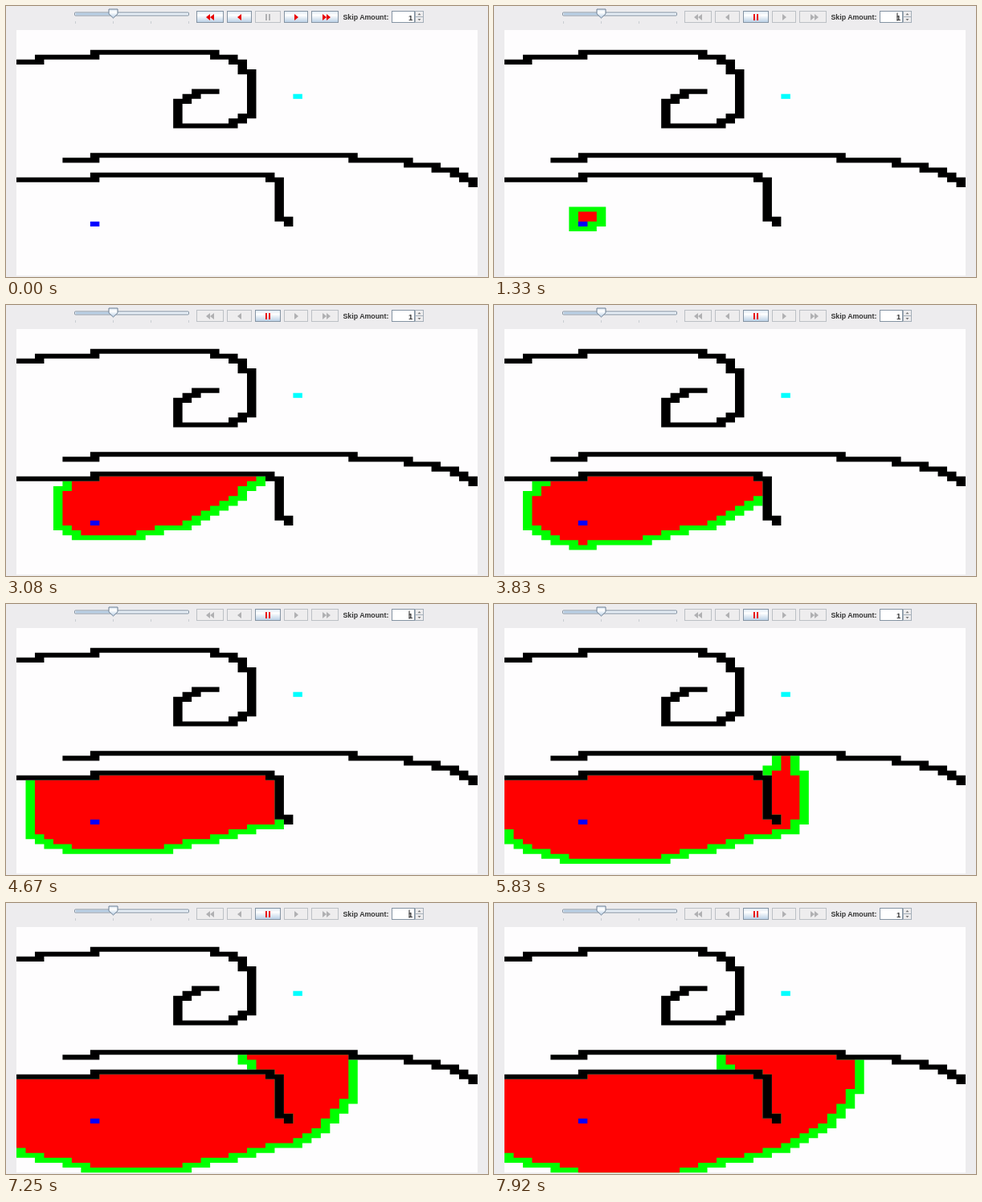
An HTML page that plays this animation: 600x338 px, repeating every 8000 ms.

```html
<!DOCTYPE html>
<html lang="en">
<head>
<meta charset="utf-8">
<title>Path search</title>
<style>
html, body { margin: 0; width: 100%; height: 100%; overflow: hidden; background: #edecee; }
svg { display: block; width: 600px; height: 338px; }
text { font-family: "Liberation Sans", Arial, sans-serif; font-weight: bold; fill: #333; }
.button rect { fill: url(#metal); stroke: #8594a3; }
.button path { fill: #e80000; }
.button.off rect { fill: #eeedee; stroke: #bcc0c5; }
.button.off path { fill: #b0b0b2; }
.button.pressed rect { fill: #b8cfe5; }
</style>
</head>
<body>
<svg viewBox="0 0 600 338">
  <defs>
    <linearGradient id="metal" x2="0" y2="1">
      <stop offset="0" stop-color="#dde8f3"/>
      <stop offset=".35" stop-color="#fff"/>
      <stop offset="1" stop-color="#b8cfe5"/>
    </linearGradient>
  </defs>
  <rect width="600" height="338" fill="#edecee"/>

  <rect x="85.5" y="8" width="142" height="4" rx="1" fill="#e6eef6" stroke="#8594a3"/>
  <path d="M87 10H132" stroke="#b8cfe5" stroke-width="2"/>
  <path d="M86.5 19v3M133.5 19v3M180.5 19v3M227.5 19v3" stroke="#c9cdd2"/>
  <path d="M128 4H139V9.8L133.5 15L128 9.8Z" fill="url(#metal)" stroke="#6c7f93"/>

  <g id="buttons"></g>

  <text x="419.5" y="17.3" font-size="8.8">Skip Amount:</text>
  <rect x="480.5" y="6.5" width="28" height="14" fill="#fff" stroke="#8594a3"/>
  <text x="506.3" y="17.5" font-size="9.5">1</text>
  <path id="caret" d="M502 8.5V18.5" stroke="#222"/>
  <g fill="#eeedee" stroke="#a4aeb8">
    <rect x="509.5" y="6.5" width="10" height="7"/>
    <rect x="509.5" y="13.5" width="10" height="7"/>
  </g>
  <path d="M512.5 11.2L514.5 9L516.5 11.2ZM512.5 16L514.5 18.2L516.5 16Z" fill="#777"/>

  <rect x="13" y="30" width="574" height="306.2" fill="#fefdfe"/>
  <path id="reached" fill="#0f0"/>
  <path id="closed" fill="#f00"/>
  <path id="walls" fill="#000"/>
  <path id="start" fill="#00f"/>
  <path id="goal" fill="#0ff"/>
</svg>
<script>
const SIZE = 50, LOOP = 8000, RUN_AT = 1167, TICK = 1000 / 12;
const start = [8, 39], goal = [30, 13];

// Wall runs: row, first column, last column
const wallRuns = [
  [6, 0, 2], [5, 2, 8], [4, 8, 21], [5, 21, 23], [6, 23, 24], [7, 24, 24], [8, 24, 25],
  [17, 24, 25], [18, 23, 24], [19, 17, 23], [14, 17, 18], [13, 18, 19], [12, 19, 21],
  [26, 5, 8], [25, 8, 36], [26, 36, 42], [27, 42, 45], [28, 45, 47], [29, 47, 48],
  [30, 48, 49], [31, 49, 49],
  [30, 0, 8], [29, 8, 27], [30, 27, 28], [38, 28, 29], [39, 29, 29]
];
const addColumn = (col, top, bottom) => {
  for (let row = top; row <= bottom; row++) wallRuns.push([row, col, col]);
};
addColumn(25, 9, 16);
addColumn(17, 15, 18);
addColumn(28, 31, 37);

const byId = id => document.getElementById(id);
const cellX = col => (13 + col * 11.48).toFixed(2);
const cellY = row => (30.15 + row * 6.12).toFixed(2);
const runPath = ([row, a, b]) =>
  `M${cellX(a)} ${cellY(row)}H${cellX(b + 1)}V${cellY(row + 1)}H${cellX(a)}Z`;
const cellsPath = test => {
  let d = '';
  for (let row = 0; row < SIZE; row++) {
    for (let col = 0; col < SIZE; col++) {
      if (!test(row * SIZE + col)) continue;
      const first = col;
      while (col + 1 < SIZE && test(row * SIZE + col + 1)) col++;
      d += runPath([row, first, col]);
    }
  }
  return d;
};

// A* with costs 10 and 14; ties go to the cell that was opened first.
function search() {
  const blocked = new Set();
  for (const [row, a, b] of wallRuns)
    for (let col = a; col <= b; col++) blocked.add(row * SIZE + col);

  const count = SIZE * SIZE;
  const openedAt = new Array(count).fill(Infinity);
  const closedAt = new Array(count).fill(Infinity);
  const cost = new Array(count).fill(Infinity);
  const estimate = (col, row) => {
    const dx = Math.abs(col - goal[0]), dy = Math.abs(row - goal[1]);
    return 10 * Math.max(dx, dy) + 4 * Math.min(dx, dy);
  };
  const total = ([col, row]) => cost[row * SIZE + col] + estimate(col, row);
  const queue = [start];
  cost[start[1] * SIZE + start[0]] = 0;

  for (let step = 0; step < 700 && queue.length; step++) {
    let best = 0;
    queue.forEach((cell, i) => { if (total(cell) < total(queue[best])) best = i; });
    const [col, row] = queue.splice(best, 1)[0];
    const here = row * SIZE + col;
    closedAt[here] = step;
    if (col === goal[0] && row === goal[1]) break;
    for (let dx = -1; dx <= 1; dx++) {
      for (let dy = -1; dy <= 1; dy++) {
        const x = col + dx, y = row + dy, next = y * SIZE + x;
        if (x < 0 || y < 0 || x >= SIZE || y >= SIZE) continue;
        if (blocked.has(next) || closedAt[next] < Infinity) continue;
        if (cost[next] === Infinity) {
          openedAt[next] = step;
          queue.push([x, y]);
        }
        cost[next] = Math.min(cost[next], cost[here] + (dx && dy ? 14 : 10));
      }
    }
  }
  return { openedAt, closedAt };
}

// The search slows slightly as its queue grows.
const stepsAt = tick =>
  tick < 1 ? 0 : Math.max(0, Math.round(8.417 * tick - 0.00246 * tick * tick - 11.65));

const left = x => `M${x} 14l5 -4v8z`;
const right = x => `M${x} 14l-5 -4v8z`;
const buttons = [
  [237, 34, left(249) + left(254)],
  [275, 31, left(288)],
  [310, 32, 'M323 10h2v8h-2zM327 10h2v8h-2z'],
  [346, 30, right(364)],
  [380, 34, right(399) + right(404)]
].map(([x, w, icon]) => {
  byId('buttons').insertAdjacentHTML('beforeend',
    `<g class="button"><rect x="${x + .5}" y="6.5" width="${w - 1}" height="14"/><path d="${icon}"/></g>`);
  return byId('buttons').lastElementChild;
});

document.querySelector('text:last-of-type').setAttribute('text-anchor', 'end');
byId('walls').setAttribute('d', wallRuns.map(runPath).join(''));
byId('start').setAttribute('d', runPath([start[1], start[0], start[0]]));
byId('goal').setAttribute('d', runPath([goal[1], goal[0], goal[0]]));
const { openedAt, closedAt } = search();

let shown = -1;
function draw(t) {
  const running = t >= RUN_AT;
  buttons.forEach((button, i) => {
    button.classList.toggle('off', (i === 2) !== running);
    button.classList.toggle('pressed', i === 3 && t >= 750 && t < 830);
  });
  const caretOn = running && t % 1000 >= 250 && t % 1000 < 750;
  byId('caret').setAttribute('visibility', caretOn ? 'visible' : 'hidden');

  const steps = stepsAt(Math.floor((t - RUN_AT + 4) / TICK));
  if (steps === shown) return;
  shown = steps;
  byId('reached').setAttribute('d', cellsPath(i => openedAt[i] < steps || closedAt[i] < steps));
  byId('closed').setAttribute('d', cellsPath(i => closedAt[i] < steps));
}

const origin = performance.now();
function frame() {
  draw((performance.now() - origin) % LOOP);
  requestAnimationFrame(frame);
}
frame();
</script>
</body>
</html>
```
